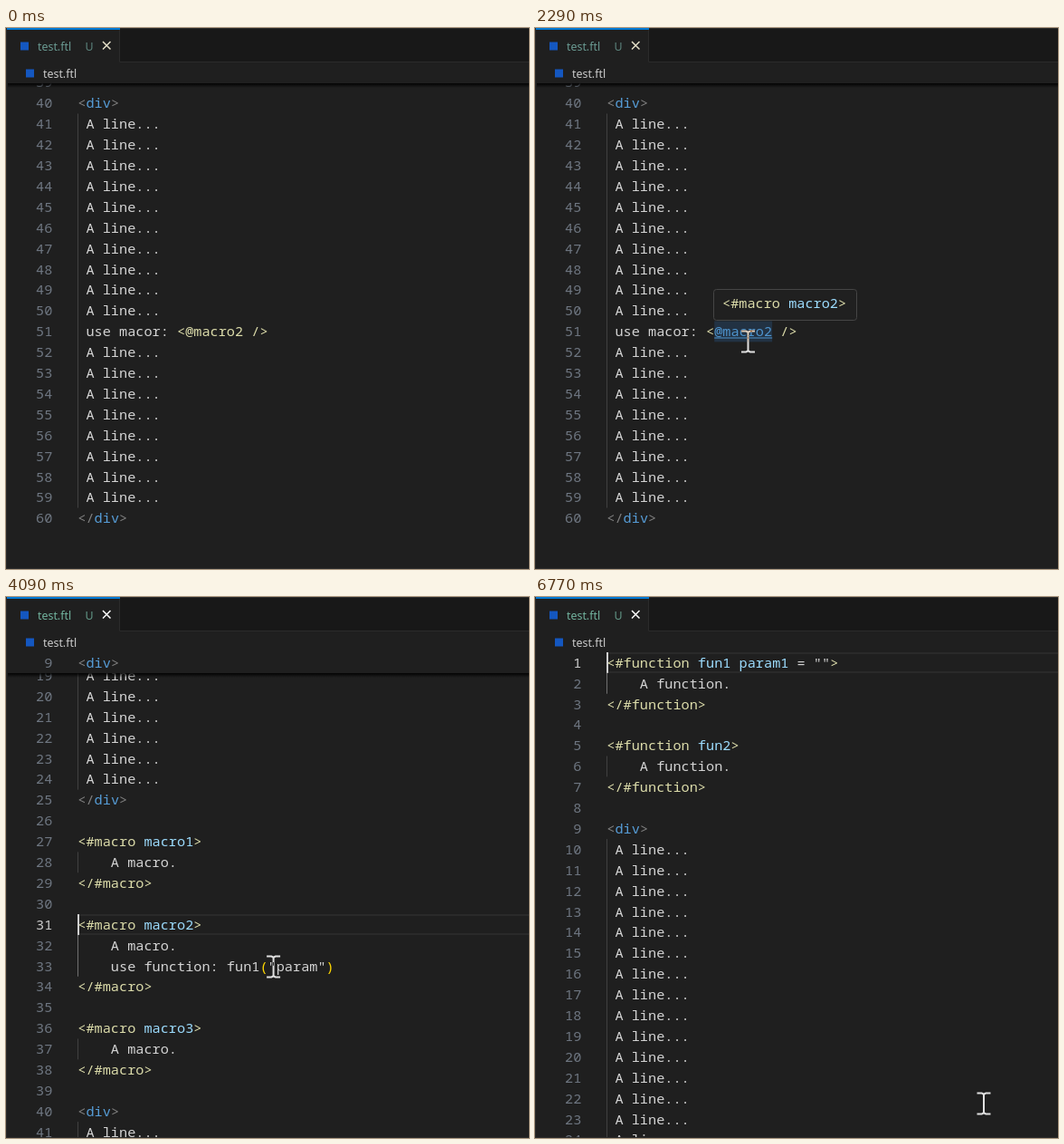
An HTML page that plays this animation: 578 by 597 pixels, repeating every 7.23 s.

```html
<!DOCTYPE html>
<html lang="en">
<head>
<meta charset="utf-8">
<title>Go to definition</title>
<style>
  html, body { margin: 0; width: 100%; height: 100%; overflow: hidden; background: #1f1f1f; }
  svg { display: block; width: 578px; height: 597px; }
  text { white-space: pre; fill: #d4d4d4; }
  .code text { font: 15.24px "Noto Sans Mono", monospace; }
  .ui text { font: 12.4px "Noto Sans", sans-serif; }
  .code .num { fill: #6e7681; text-anchor: end; }
  .code .num.on { fill: #ccc; }
  .kw { fill: #dcdcaa; }
  .var { fill: #9cdcfe; }
  .tag { fill: #569cd6; }
  .dim { fill: #808080; }
  .gold { fill: #ffd700; }
  .linked .ref { fill: #4e94ce; }
  .guide { fill: #404040; }
  .guide.on { fill: #707070; }
  #beam { mix-blend-mode: difference; fill: #fff; }
</style>
</head>
<body>
<svg id="stage" viewBox="0 0 578 597">
  <defs>
    <linearGradient id="fade" x2="0" y2="1">
      <stop stop-color="#000" stop-opacity=".9"/>
      <stop offset="1" stop-color="#000" stop-opacity="0"/>
    </linearGradient>
  </defs>
  <rect width="578" height="597" fill="#1f1f1f"/>
  <g id="doc" class="code"></g>
  <g id="popup" class="code">
    <rect x="197.5" y="288.5" width="158" height="34" rx="3" fill="#202020" stroke="#454545"/>
    <text x="207" y="309.4"><tspan class="kw">&lt;#macro</tspan><tspan class="var"> macro2</tspan><tspan class="kw">&gt;</tspan></text>
  </g>
  <g id="sticky" class="code">
    <rect y="61" width="578" height="23" fill="#1f1f1f"/>
    <text class="num" x="51.3" y="77.6">9</text>
    <text x="79.3" y="77.6"><tspan class="dim">&lt;</tspan><tspan class="tag">div</tspan><tspan class="dim">&gt;</tspan></text>
  </g>
  <rect id="shadow" width="576" x="2" height="5" fill="url(#fade)"/>
  <g class="ui">
    <rect width="578" height="61" fill="#1f1f1f"/>
    <rect x="125" width="453" height="38" fill="#181818"/>
    <path d="M125.5 0V37.5H578M126 .5H578" fill="none" stroke="#2b2b2b"/>
    <rect width="126" height="2" fill="#0078d4"/>
    <rect x="16" y="15.5" width="9" height="9" fill="#1457c0"/>
    <rect x="22" y="45.5" width="9" height="9" fill="#1457c0"/>
    <g id="title">
      <text x="35" y="24.5" style="fill:inherit">test.ftl</text>
      <text x="87.5" y="24.5" style="fill:inherit" opacity=".8">U</text>
    </g>
    <path id="cross" d="M107 15l8.5 8.5m0-8.5l-8.5 8.5" stroke-width="1.5"/>
    <text x="41" y="54.5" style="fill:#ccc">test.ftl</text>
  </g>
  <path d="M.5 0V597M0 596.5H578" stroke="#2b2b2b" fill="none"/>
  <path id="beam" d="M-7.5-12.5h5.5l2 1 2-1h5.5v2h-5l-1.5 1v19l1.500 1h5v2h-5.500l-2-1-2 1h-5.500v-2h5l1.500-1v-19l-1.500-1h-5z"/>
  <path id="hand" d="M-3 18V3a2.800 2.800 0 0 1 5.600 0v8q4-2 4 1q4-1 4 1.500q3-.5 3 2.500v6q0 3-2.500 6v1.500h-11.500v-2l-7.500-9.500q-1-4 2-3.500z" fill="#fff" stroke="#000"/>
  <g id="arrow" stroke="#000" fill="#fff">
    <path d="M1 0V22l5-4.500 4.500 11.500 4-1.500-4.500-11.500h6z"/>
    <path d="M16-1l2.500 3h-1.500v1.500h1.500v-1.500l3 2.500-3 2.500v-1.500h-1.500v1.500h1.500l-2.500 3-2.500-3h1.500v-1.500h-1.500v1.500l-3-2.500 3-2.500v1.500h1.500v-1.500h-1.500z" stroke-width=".5"/>
  </g>
  <circle id="click" r="18" fill="#fff000" fill-opacity=".52"/>
</svg>
<script>
const LOOP = 7230, ROW = 22.9, CH = 9.144, LEFT = 79.3;
const $ = id => document.getElementById(id);
const colX = col => LEFT + CH * col;
const rowTop = n => n * ROW - ROW / 2;

function add(parent, name, attrs, text) {
  const el = document.createElementNS('http://www.w3.org/2000/svg', name);
  for (const key in attrs) el.setAttribute(key, attrs[key]);
  if (text) el.textContent = text;
  return parent.appendChild(el);
}
const show = (el, on) => { el.style.display = on ? '' : 'none'; };
const place = (el, x, y) => el.setAttribute('transform', `translate(${x} ${y})`);
const within = (t, spans) => spans.some(([a, b]) => t >= a && t < b);

// Document text: each line is a list of [text, class] tokens.
const divTag = slash => [['<' + slash, 'dim'], ['div', 'tag'], ['>', 'dim']];
const opening = (kind, name) => [['<#' + kind, 'kw'], [' ' + name, 'var'], ['>', 'kw']];
const closing = kind => [['</#' + kind + '>', 'kw']];
const plain = text => [[text, '']];
const block = count => [divTag(''), ...Array(count).fill(plain(' A line...')), divTag('/')];
const lines = [
  [['<#function', 'kw'], [' fun1 param1', 'var'], [' = ""', ''], ['>', 'kw']],
  plain('    A function.'), closing('function'), [],
  opening('function', 'fun2'), plain('    A function.'), closing('function'), [],
  ...block(15), [],
  opening('macro', 'macro1'), plain('    A macro.'), closing('macro'), [],
  opening('macro', 'macro2'), plain('    A macro.'),
  [['    use function: ', ''], ['fun1', 'ref'], ['(', 'gold ref'], ['"param"', 'ref'], [')', 'gold ref']],
  closing('macro'), [],
  opening('macro', 'macro3'), plain('    A macro.'), closing('macro'), [],
  ...block(19)
];
lines[50] = [[' use macor: ', ''], ['<', 'kw'], ['@macro2', 'kw ref'], [' />', 'kw']];

// Document layers, back to front. Line n is centred on y = n * ROW.
const doc = $('doc');
const lineBox = add(doc, 'path', { d: 'M79 1H578M79 22H578', stroke: '#2a2a2a', 'stroke-width': 2 });
const symbolBox = add(doc, 'rect', { height: ROW, fill: '#623315' });
const wordBox = add(doc, 'rect', { x: colX(13), y: rowTop(51), width: CH * 7, height: ROW, fill: '#264f78', opacity: .4 });
const guides = [[2, 2], [6, 6], [10, 24], [28, 28], [32, 33], [37, 37], [41, 59]].map(([a, b]) => ({
  a, b, el: add(doc, 'rect', { class: 'guide', x: 79, y: rowTop(a), width: 1, height: (b - a + 1) * ROW })
}));
const numbers = lines.map((tokens, i) => {
  const y = (i + 1) * ROW + 5.3;
  const number = add(doc, 'text', { class: 'num', x: 51.3, y }, String(i + 1));
  const text = add(doc, 'text', { x: LEFT, y });
  for (const [part, cls] of tokens) add(text, 'tspan', { class: cls }, part);
  return number;
});
const underline = (n, col, len) =>
  add(doc, 'rect', { x: colX(col), y: n * ROW + 6.6, width: CH * len, height: 1, fill: '#4e94ce' });
const underlines = [underline(51, 13, 7), underline(33, 18, 13)];
const brackets = add(doc, 'g', { fill: 'none', stroke: '#888' });
for (const col of [22, 30])
  add(brackets, 'rect', { x: colX(col), y: rowTop(33) + .5, width: CH, height: ROW - 1 });
const caret = add(doc, 'rect', { width: 2, height: ROW, fill: '#d0d0d0' });

// start, end, steps, from x/y, to x/y
const moves = [
  [330, 1020, 11, 468, 544, 251, 361],
  [1090, 1360, 4, 251, 361, 236, 347],
  [2290, 2360, 2, 236, 347, 235, 345],
  [3370, 3370, 1, 235, 345, 234, 343],
  [3700, 4170, 8, 234, 343, 307, 420],
  [4240, 4310, 2, 307, 420, 316, 416],
  [5760, 6030, 5, 316, 416, 496, 559]
];
function pointer(t) {
  const move = moves.filter(m => t >= m[0]).pop();
  if (!move) return null;
  const [start, end, steps, x0, y0, x1, y1] = move;
  const tick = (end - start) / (steps - 1) || 1;
  const p = Math.min(steps, Math.floor((t - start) / tick + .02) + 1) / steps;
  const e = p * p * (3 - 2 * p);
  return [x0 + (x1 - x0) * e, y0 + (y1 - y0) * e];
}

// start, scroll offset, header bottom, current line, caret column
const states = [
  [0, -833, 61, 0, 0],
  [2750, -833, 61, 51, 17],
  [2960, -348.4, 84, 31, 0],
  [4570, -348.4, 84, 33, 26],
  [4770, 49.5, 0, 1, 0]
];
const caretOn = [[2750, 3510], [3980, 4440], [4570, 5300], [5760, 6300], [6770, LOOP]];

function draw(t) {
  const [, offset, edge, line, col] = states.filter(s => t >= s[0]).pop();
  place(doc, 0, offset);
  show($('sticky'), edge === 84);
  show($('shadow'), edge);
  $('shadow').setAttribute('y', edge);

  numbers.forEach((el, i) => el.classList.toggle('on', i + 1 === line));
  guides.forEach(g => g.el.classList.toggle('on', line >= g.a - 1 && line <= g.b + 1));
  show(lineBox, line && line !== 51);
  place(lineBox, 0, rowTop(line));
  show(caret, within(t, caretOn));
  place(caret, 79 + CH * col, rowTop(line));

  show(symbolBox, within(t, [[2960, 3310], [4770, 5100]]));
  place(symbolBox, LEFT, rowTop(line));
  symbolBox.setAttribute('width', CH * (line === 1 ? 28 : 15));

  const links = [within(t, [[1290, 2960]]), within(t, [[4170, 4770]])];
  doc.classList.toggle('linked', links[0] || links[1]);
  underlines.forEach((el, i) => show(el, links[i]));
  show(brackets, line === 33);
  const hovering = within(t, [[1630, 2750]]);
  show(wordBox, hovering);
  show($('popup'), hovering);
  $('popup').style.opacity = t < 1700 ? .5 : 1;

  const focused = t >= 2750;
  $('title').style.fill = focused ? '#73b5a0' : '#6b9c94';
  $('cross').style.stroke = focused ? '#fff' : '#e4dfc8';

  const at = pointer(t);
  const hand = within(t, [[2420, 3370], [4310, 4630]]);
  const arrow = within(t, [[4630, 4770]]);
  const [hotX, hotY] = t < 3400 ? [231, 341] : [313, 414];
  show($('beam'), at && !hand && !arrow);
  if (at) place($('beam'), at[0], at[1]);
  show($('hand'), hand);
  show($('arrow'), arrow);
  show($('click'), within(t, [[2750, 2960], [4510, 4770]]));
  for (const id of ['hand', 'arrow', 'click']) place($(id), hotX, hotY);
}

const began = performance.now();
function frame() {
  draw((performance.now() - began) % LOOP);
  requestAnimationFrame(frame);
}
frame();
</script>
</body>
</html>
```
